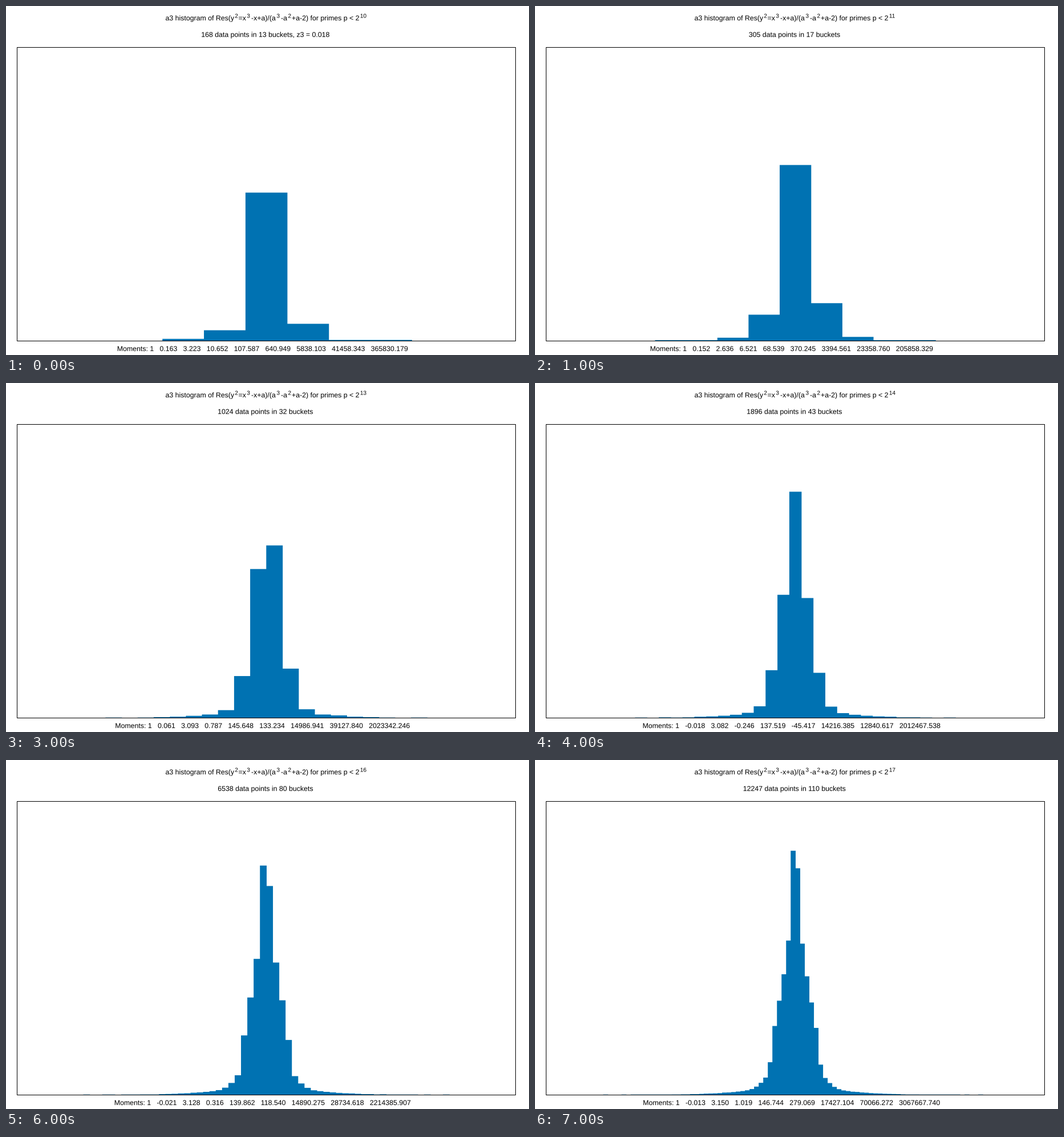
These frames come from a looping animation (917x611 px, 8000 ms). A matplotlib script:

```python
import numpy as np
import matplotlib.pyplot as plt
from matplotlib.animation import FuncAnimation
from matplotlib.patches import PathPatch, Rectangle
from matplotlib.path import Path
from matplotlib.textpath import TextPath

W, H, DPI = 917, 611, 64
LEFT, RIGHT, TOP, BASE = 19.5, 893.5, 72.5, 586.5
REACH = 20                    # a3 runs from -REACH to REACH
UNIT = (BASE - TOP) / 21      # height of one count times the bucket number
FIRST_POWER = 10
BAD_PRIMES = 4
BLUE = "#0072b2"

MOMENTS = [
    "0.163 3.223 10.652 107.587 640.949 5838.103 41458.343 365830.179",
    "0.152 2.636 6.521 68.539 370.245 3394.561 23358.760 205858.329",
    "0.074 2.672 2.014 81.028 7.362 4893.920 -7942.223 361119.348",
    "0.061 3.093 0.787 145.648 133.234 14986.941 39127.840 2023342.246",
    "-0.018 3.082 -0.246 137.519 -45.417 14216.385 12840.617 2012467.538",
    "-0.043 3.144 -0.808 135.334 -32.912 13387.739 1300.243 1813964.761",
    "-0.021 3.128 0.316 139.862 118.540 14890.275 28734.618 2214385.907",
    "-0.013 3.150 1.019 146.744 279.069 17427.104 70066.272 3067667.740",
]

plt.rcParams["font.family"] = "Liberation Sans"


def count_primes(limit):
    sieve = np.ones(limit, dtype=bool)
    sieve[:2] = False
    for k in range(2, int(limit ** 0.5) + 1):
        sieve[k * k::k] = False
    return int(sieve.sum())


def a3_values(n=200_000):
    """Sample a3 for primes that split, split in part or stay inert (1:3:2)."""
    rng = np.random.default_rng(3)

    def trace(*shape):
        return 4 * rng.beta(1.5, 1.5, shape) - 2

    t = trace(3, n)
    split = t.prod(axis=0) + 2 * t.sum(axis=0)
    mixed = trace(3 * n) * trace(3 * n)
    inert = trace(2 * n)
    values = np.concatenate([split, mixed, inert])
    return np.concatenate([values, -values])


def bucket_edges(low, high, buckets):
    """The first and last bucket are centred on low and high."""
    return np.linspace(low, high, buckets)[0] + (
        np.arange(buckets + 1) - 0.5) * (high - low) / (buckets - 1)


def histogram(points, mean):
    buckets = int(points ** 0.5 + 0.1)
    edges = bucket_edges(-REACH, REACH, buckets)
    share = np.histogram(VALUES + mean, edges)[0] / len(VALUES)
    # rounding the running total leaves single counts scattered in the tails
    total = np.round(points * np.cumsum(share))
    return np.diff(total, prepend=0)


VALUES = a3_values()
POINTS = [count_primes(2 ** (FIRST_POWER + i)) - BAD_PRIMES
          for i in range(len(MOMENTS))]
HISTOGRAMS = [histogram(n, float(row.split()[0]))
              for n, row in zip(POINTS, MOMENTS)]

fig = plt.figure(figsize=(W / DPI, H / DPI), dpi=DPI, facecolor="white")
ax = fig.add_axes([0, 0, 1, 1])
ax.set(xlim=(0, W), ylim=(H, 0))
ax.axis("off")


def glyphs(text, x, y, px=12.33, centre=False):
    """Outline of a text line on the baseline y, from x or centred on x."""
    path = TextPath((0, 0), text, size=px)
    if centre:
        box = path.get_extents()
        x -= (box.x0 + box.x1) / 2
    return Path(path.vertices * [1, -1] + [x, y], path.codes)


def power(text, x):
    return glyphs(text, x, 20.6, px=10)


def add_text(path):
    return ax.add_patch(PathPatch(path, facecolor="black", linewidth=0,
                                  snap=False))


for text, x in [("a3 histogram of Res(y", 279.5), ("=x", 407.5),
                ("-x+a)/(a", 430), ("-a", 482),
                ("+a-2) for primes p < 2", 501)]:
    add_text(glyphs(text, x, 25.2))
for text, x in [("2", 401.3), ("3", 422.3), ("3", 474.5), ("2", 494.5)]:
    add_text(power(text, x))
exponent = add_text(power("0", 0))
summary = add_text(power("0", 0))
moments = add_text(power("0", 0))

bars = ax.stairs([BASE], [LEFT, RIGHT], baseline=BASE, fill=True,
                 facecolor=BLUE, snap=False)
ax.add_patch(Rectangle((LEFT, TOP), RIGHT - LEFT, BASE - TOP, fill=False,
                       edgecolor="black", linewidth=72 / DPI, snap=False,
                       zorder=3))


def draw(i):
    counts = HISTOGRAMS[i]
    buckets = len(counts)
    heights = np.where(counts > 0, np.maximum(counts * UNIT / buckets, 0.8), 0)
    # the taller bar of each pair reaches slightly over the shared edge
    rise = np.diff(np.concatenate([[0], heights, [0]])) > 0
    edges = bucket_edges(LEFT, RIGHT, buckets) + np.where(rise, -0.2, 0.5)
    bars.set_data(BASE - heights, edges, BASE)

    extra = ", z3 = 0.018" if i == 0 else ""
    line = f"{POINTS[i]} data points in {buckets} buckets{extra}"
    row = "   ".join(["Moments: 1"] + MOMENTS[i].split())
    exponent.set_path(power(str(FIRST_POWER + i), 620.9))
    summary.set_path(glyphs(line, 455, 54.2, centre=True))
    moments.set_path(glyphs(row, 450, 604.1, centre=True))
    return bars, exponent, summary, moments


anim = FuncAnimation(fig, draw, frames=len(MOMENTS), interval=1000,
                     repeat=True, repeat_delay=0, blit=False)
plt.show()
```
